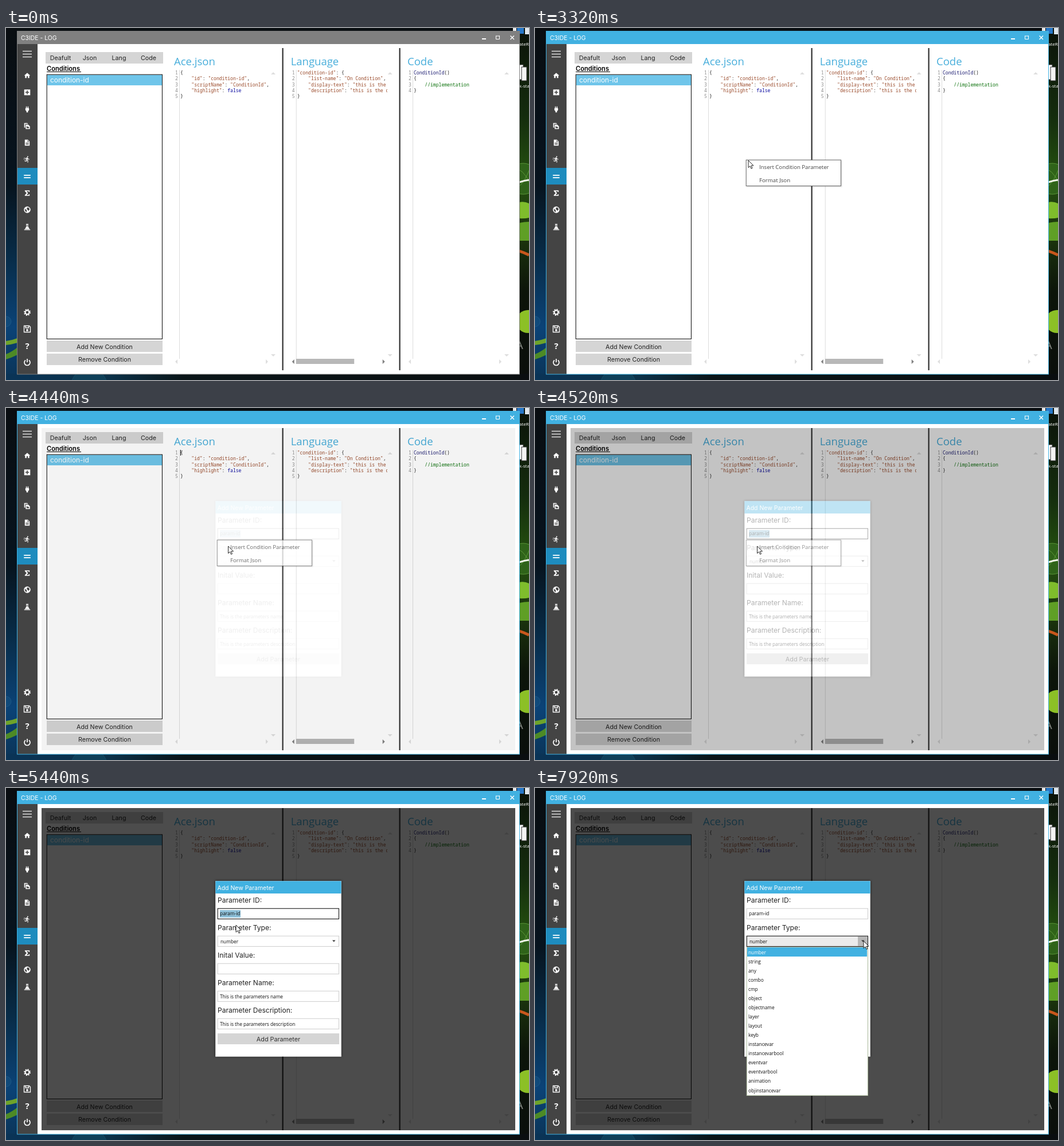
Recreate the animation shown at these times as an HTML page. Size 912 by 614 pixels, loop 8 s.

```html
<!DOCTYPE html>
<html lang="en">
<head>
<meta charset="utf-8">
<title>IDE condition editor</title>
<style>
html, body { margin: 0; width: 100%; height: 100%; overflow: hidden; background: #0a0f12; }
svg { display: block; }
text { font-family: "Open Sans", "Noto Sans", sans-serif; white-space: pre; }
.geo { font-family: Inter, sans-serif; }
.mono { font-family: "Noto Sans Mono", monospace; font-size: 8.07px; }
.mid { text-anchor: middle; }
#dialog { filter: drop-shadow(0 0 2px #000a); }
#menuBox { filter: drop-shadow(1px 1px 1px #0003); }
</style>
</head>
<body>
<svg id="stage" width="912" height="614" viewBox="0 0 912 614"></svg>
<script>
const LOOP = 8000, STEP = 40;
const BLUE = '#41b1e1', GREY = '#808080', BUTTON = '#d5d5d5';
const stage = document.getElementById('stage');

const rect = (x, y, w, h, fill, more = '') =>
  `<rect x="${x}" y="${y}" width="${w}" height="${h}" fill="${fill}" ${more}/>`;
const box = (x, y, w, h, stroke, more = '') =>
  rect(x + .2, y + .2, w - .8, h - .8, '#fff', `stroke="${stroke}" ${more}`);
const text = (x, y, size, str, fill = '#222', more = '') =>
  `<text x="${x}" y="${y}" font-size="${size}" fill="${fill}" ${more}>${str}</text>`;
const geo = (x, y, size, str, fill, cls = '') =>
  text(x, y, size, str, fill, `class="geo ${cls}"`);
const path = (d, fill, more = '') => `<path d="${d}" fill="${fill}" ${more}/>`;
const line = (d, stroke, width = 1, more = '') =>
  path(d, 'none', `stroke="${stroke}" stroke-width="${width}" ${more}`);
const gradient = (id, stops, attrs) => `<linearGradient id="${id}" ${attrs}>` +
  stops.map(([at, c]) => `<stop offset="${at}" stop-color="${c}"/>`).join('') + '</linearGradient>';

function desktop() {
  const down = 'x2="0" y2="1"';
  return gradient('west', [[0, '#090d11'], [.45, '#07141f'], [.65, '#082c48'], [.85, '#0b4377'], [1, '#0a3457']], down) +
    gradient('east', [[0, '#0b1209'], [.25, '#142c0d'], [.42, '#24500f'], [.6, '#1b330d'], [.75, '#0c1409'], [1, '#0a0e0b']], down) +
    gradient('south', [[0, '#0a3457'], [.2, '#0b3148'], [.34, '#0a1518'], [1, '#0a0e10']], '') +
    rect(0, 0, 912, 614, '#0a0f12') +
    rect(0, 0, 20, 614, 'url(#west)') + rect(895, 0, 17, 614, 'url(#east)') +
    rect(0, 603, 912, 11, 'url(#south)') +
    '<circle cx="0" cy="512" r="9" fill="#14507f" stroke="#2a6590" opacity=".6"/>' +
    '<circle cx="145" cy="626" r="32" fill="#124a63" stroke="#1c6177" opacity=".6"/>' +
    path('M0 546Q10 545 20 541V549Q10 552 0 553Z', '#6ea32a') +
    path('M0 569Q10 565 20 557V570Q10 575 0 578Z', '#4d8a26') +
    rect(884, 0, 6, 6, '#e8e8e8') + rect(891, 0, 12, 10, '#2878c8') + rect(905, 0, 7, 11, '#dfe7ee') +
    text(895, 31, 8, 'ateR', '#fff') + text(895, 104, 8, 'k-sta', '#fff') +
    rect(893, 64, 9, 26, '#fff', 'stroke="#333"') + rect(899, 68, 9, 24, '#f4f4f4', 'stroke="#333"') +
    '<circle cx="902" cy="263" r="27" fill="#2f6319" stroke="#5b9638"/>' +
    line('M893 246Q910 254 918 286M893 278Q905 268 914 244', '#5b9638') +
    line('M895 269Q904 266 912 265', '#f0f5e8', 3) +
    path('M895 304Q904 302 912 306V331Q904 333 895 332Z', '#7fbd2c') +
    path('M895 340Q904 338 912 338V371H895Z', '#5f9f25') +
    line('M895 389Q904 392 912 396', '#c8571c', 5) +
    '<circle cx="910" cy="512" r="20" fill="#8cc026"/>' +
    text(889, 560, 20, 'A', '#8a8f88');
}

const icons = [
  [83, 'M10 20v-6h4v6h5v-8h3L12 3 2 12h3v8z'],
  [112, 'M2 3h20v19H2zM18 11h-4.500V6.500h-3V11H6v3h4.500v4.500h3V14H18z'],
  [142, 'M16 7V2h-2.500v5h-3V2H8v5Q6 7 6 9v5.500L9.500 18v4h5v-4l3.500-3.500V9Q18 7 16 7z'],
  [171, 'M2 2h10l3 3H5v12H2zM7 7h8l6 6v9H7zM10 13v6h8v-4h-5v-2z'],
  [200, 'M4 2h10l6 6v14H4zM7 12v2h10v-2zM7 16v2h10v-2zM13 3.500V9h5.500z'],
  [229, 'M13.500 5.500a2 2 0 1 0 0-4a2 2 0 0 0 0 4zM9.800 19.400l1-4.400 2.100 2v6h2v-7.500l-2.100-2 .6-3A7 7 0 0 0 19 13v-2a5 5 0 0 1-4.300-2.400l-1-1.600c-.6-.9-1.700-1.200-2.600-.8L6 8.300V13h2V9.600l1.800-.7-1.600 8.100-4.900-1-.4 2zM1 7h4v1.500H1zM0 11h4v1.500H0z'],
  [259, 'M1 6.500h22v3H1zM1 14.500h22v3H1z'],
  [288, 'M4 3h16v5h-3V6h-7l5 6-5 6h7v-2h3v5H4v-2.500l6-6.500-6-6.500z'],
  [317, 'M12 1a11 11 0 1 0 0 22a11 11 0 0 0 0-22zM4 9l5 3 2 4-2 4q-5-3-5-11zM13 4l5 2 2 5-4 5-3-4-3-3z'],
  [347, 'M8 2h8v2h-1v7l5 8H4l5-8V4H8zM2 20h20v2.500H2zM11 5v6h2V5z'],
];

function sidebar() {
  const white = 'stroke="#fff" fill="none"';
  return rect(20, 28, 35, 575.5, '#444') + rect(20, 244, 35, 29, '#1e8cbe') +
    line('M29 40.500H45M29 45.500H45M29 50.500H45', '#ddd', 1.5) +
    icons.map(([y, d]) => path(d, '#fff', `fill-rule="evenodd" transform="translate(30.700 ${y - 6.3}) scale(.525)"`)).join('') +
    `<circle cx="37" cy="496" r="3.400" ${white} stroke-width="2"/>` +
    `<circle cx="37" cy="496" r="5" ${white} stroke-width="2" stroke-dasharray="2 1.927"/>` +
    line('M31.500 519.500H40.500L42.500 521.500V530.500H31.500ZM34 520V523H39.500V520', '#fff', 1.3) +
    '<circle cx="37" cy="527" r="1.900" fill="#fff"/>' +
    text(37, 559.5, 15, '?', '#fff', 'class="mid" font-weight="700"') +
    line('M34 579.500A5 5 0 1 0 40 579.500M37 577V583', '#fff', 1.7);
}

const tint = color => s => `<tspan fill='${color}'>${s}</tspan>`;
const highlight = s => s
  .replace(/"[^"]*"?/g, tint('#9a4a2a'))
  .replace(/\bfalse\b/, tint('#0a0aa0'))
  .replace(/\/\/.*/, tint('#0a700a'))
  .replace(/ConditionId(?=\()/, tint('#191970'));

// One editor column; x is the left edge of the line numbers.
function editor(x, title, clip, lines, scroll) {
  const dim = '#dedede', side = scroll ? '#808080' : dim;
  const rows = lines.map((s, i) => {
    const y = 81 + i * 10.25;
    return text(x, y, 8, i + 1, '#8a8a8a', 'class="mono"') +
      text(x + 9, y, 8, highlight(s), '#222', 'class="mono"');
  }).join('');
  return text(x - 2, 65, 18.5, title, '#48aedb') +
    `<svg width="${clip}" height="614">${rows}</svg>` +
    rect(x + 7, 73, 1, 504, '#dcdcdc') +
    path(`M${x + 167} 81h8l-4-4z M${x + 167} 569h8l-4 4z`, dim) +
    path(`M${x + 4} 578v8l-4-4z M${x + 158} 578v8l4-4z`, side) +
    (scroll ? rect(x + 7, 577, 101.5, 9, '#b8b8b8') : '');
}

function app() {
  const tabs = [['Deafult', 95], ['Json', 146], ['Lang', 197], ['Code', 248.5]];
  return rect(19, 5, 877, 599.5, GREY, 'class="frame"') + rect(55, 28, 840, 575.5, '#fff') +
    geo(26, 21, 10.4, 'C3IDE - LOG', '#fff') +
    rect(830, 18, 7, 2, '#fff') + line('M854.500 14H861M854.500 13.500V19.500H860.500V13.500', '#fff') +
    line('M879.500 13.500L886 20M886 13.500L879.500 20', '#fff', 1.4) +
    sidebar() +
    rect(69, 42, 205, 20, BUTTON) +
    tabs.map(([s, x]) => geo(x, 56, 10.7, s, '#222', 'mid')).join('') +
    text(71, 75, 11.1, 'Conditions', '#000', 'class="geo" font-weight="600"') + rect(71, 76, 60, 1, '#000') +
    box(71, 81, 202, 462, '#000') + rect(72, 82, 200, 18, '#6fc5ea') +
    geo(77, 95, 11.9, 'condition-id', '#fff') +
    rect(71, 545, 202, 20, BUTTON) + geo(172, 559.5, 10.7, 'Add New Condition', '#222', 'mid') +
    rect(71, 568, 202, 20, BUTTON) + geo(172, 582, 10.7, 'Remove Condition', '#222', 'mid') +
    rect(481.5, 35, 2.2, 562, '#303030') + rect(685.5, 35, 2.2, 562, '#303030') +
    editor(295, 'Ace.json', 480, ['{', '    "id": "condition-id",', '    "scriptName": "ConditionId",', '    "highlight": false', '}']) +
    editor(498.7, 'Language', 665, ['"condition-id": {', '    "list-name": "On Condition",',
      '    "display-text": "this is the condition', '    "description": "this is the description', '}'], true) +
    editor(702, 'Code', 890, ['ConditionId()', '{', '    //implementation', '}']) +
    rect(304, 73, 1, 10, '#000', 'id="caret"');
}

const types = ('number string any combo cmp object objectname layer layout keyb instancevar ' +
  'instancevarbool eventvar eventvarbool animation objinstancevar').split(' ');

function dialog() {
  const fields = [['Parameter ID:', ''], ['Parameter Type:', ''], ['Inital Value:', ''],
    ['Parameter Name:', 'This is the parameters name'], ['Parameter Description:', 'This is the parameters description']];
  return path('M62 35H888V597H62ZM365.300 162.300V468.500H584.600V162.300Z', '#000', 'id="dim"') +
    '<g id="dialog">' + rect(365.3, 162.3, 219.3, 306.2, '#fff') + rect(365.3, 162.3, 219.3, 21.7, BLUE) +
    geo(368.5, 177.5, 10.45, 'Add New Parameter', '#fff') +
    fields.map(([label, value], i) => {
      const y = 210 + Math.round(i * 47.9);
      return geo(369, y - 10.3, 12, label, '#222') + box(369, y, 212, 19, '#ccc', `id="field${i}"`) +
        text(373, y + 12.5, 8.3, value, '#111');
    }).join('') +
    rect(373, 213, 36, 13, '#8ec0d8', 'id="selection"') + text(373, 222, 8.4, 'param-id', '#111') +
    rect(563, 259, 17, 17, '#b8b8b8', 'id="drop"') +
    text(374, 270.5, 8.3, 'number', '#111') + path('M569 265.500h5.500l-2.750 3z', '#333') +
    rect(369, 428, 212, 19, BUTTON) + geo(475, 442, 10.8, 'Add Parameter', '#333', 'mid') + '</g>' +
    '<svg id="popup" y="277" width="912" height="260"><g id="list">' + box(369, 0, 212, 260, '#a9b89a') +
    rect(370, 1, 209, 16, BLUE) +
    types.map((s, i) => text(372, 12.5 + i * 16.07, 8.25, s, i ? '#111' : '#fff')).join('') + '</g></svg>';
}

const menu = () => '<g id="menu">' + box(368, 230, 166, 46, '#666', 'id="menuBox"') +
  rect(369, 231, 164, 22, '#dedede', 'id="hover"') +
  text(391, 245.5, 9.6, 'Insert Condition Parameter', '#444') +
  text(391, 268.5, 9.7, 'Format Json', '#444') + '</g>';

const pointer = () =>
  path('M0 0V12.500L3 9.800L5 14.300L7 13.400L5 9H9Z', '#fff', 'stroke="#111" stroke-width=".9" id="arrow"') +
  line('M-3 -5.500H-1L0 -5L1 -5.500H3M0 -5V5M-3 5.500H-1L0 5L1 5.500H3', '#111', 1, 'id="beam"');

stage.innerHTML = desktop() + app() + dialog() + menu() + pointer();
const el = {};
stage.querySelectorAll('[id]').forEach(n => el[n.id] = n);
const frame = stage.querySelector('.frame');

const stops = [[560, 812, 618], [720, 650, 550], [880, 530, 529], [1120, 452, 536], [1280, 452, 536],
  [2000, 370, 230], [3280, 370, 230], [3560, 384, 237], [3680, 384, 237], [3760, 387.5, 241],
  [5400, 387.5, 241], [5440, 401, 239], [5760, 448, 225], [5880, 448, 225], [6120, 448, 221],
  [6720, 448, 221], [7520, 573, 267], [LOOP, 573, 267]];

const ramp = (t, from, to) => Math.min(1, Math.max(0, (t - from) / (to - from)));

function pointerAt(t) {
  const i = Math.max(1, stops.findIndex(s => s[0] > t));
  const [t0, x0, y0] = stops[i - 1], [t1, x1, y1] = stops[i];
  let k = ramp(t, t0, t1);
  if (t1 - t0 > 600) k = k * k * (3 - 2 * k);
  return [x0 + (x1 - x0) * k, y0 + (y1 - y0) * k];
}

const show = (node, on) => node.setAttribute('visibility', on ? 'visible' : 'hidden');
const fade = (node, a) => { node.style.opacity = a; show(node, a > 0); };

function draw(t) {
  const [x, y] = pointerAt(t);
  const inField = t > 5440 && y > 210 && y < 229;
  const inEditor = t < 2200 && x < 680 && y < 577;
  const beam = inField || inEditor;
  for (const n of [el.arrow, el.beam]) n.setAttribute('transform', `translate(${x.toFixed(1)} ${y.toFixed(1)})`);
  show(el.arrow, t >= 600 && !beam);
  show(el.beam, t >= 600 && beam);

  frame.setAttribute('fill', t >= 2160 ? BLUE : GREY);
  show(el.caret, t >= 4360 && t < 4480);

  fade(el.menu, t < 4360 ? ramp(t, 2200, 2440) : 1 - ramp(t, 4360, 4720));
  el.hover.style.opacity = t >= 3360 && t < 4400 ? 1 : 0;

  const open = ramp(t, 4420, 4720);
  fade(el.dim, open * .7);
  fade(el.dialog, open);
  el.selection.style.opacity = t < 6000 ? 1 : 0;

  const onCombo = t > 6720 && y >= 258;
  el.field0.setAttribute('stroke', t < 7560 ? '#000' : '#ccc');
  el.field1.setAttribute('stroke', onCombo ? '#000' : '#ccc');
  el.field1.setAttribute('fill', onCombo ? '#ebebeb' : '#fff');
  el.drop.style.opacity = onCombo ? 1 : 0;

  const slide = ramp(t, 7560, 7840);
  el.popup.style.display = slide ? '' : 'none';
  el.list.setAttribute('transform', `translate(0 ${260 * (slide - 1)})`);
}

const start = performance.now();
function tick() {
  const t = (performance.now() - start) % LOOP;
  draw(Math.floor(t / STEP) * STEP);
  requestAnimationFrame(tick);
}
tick();
</script>
</body>
</html>
```
